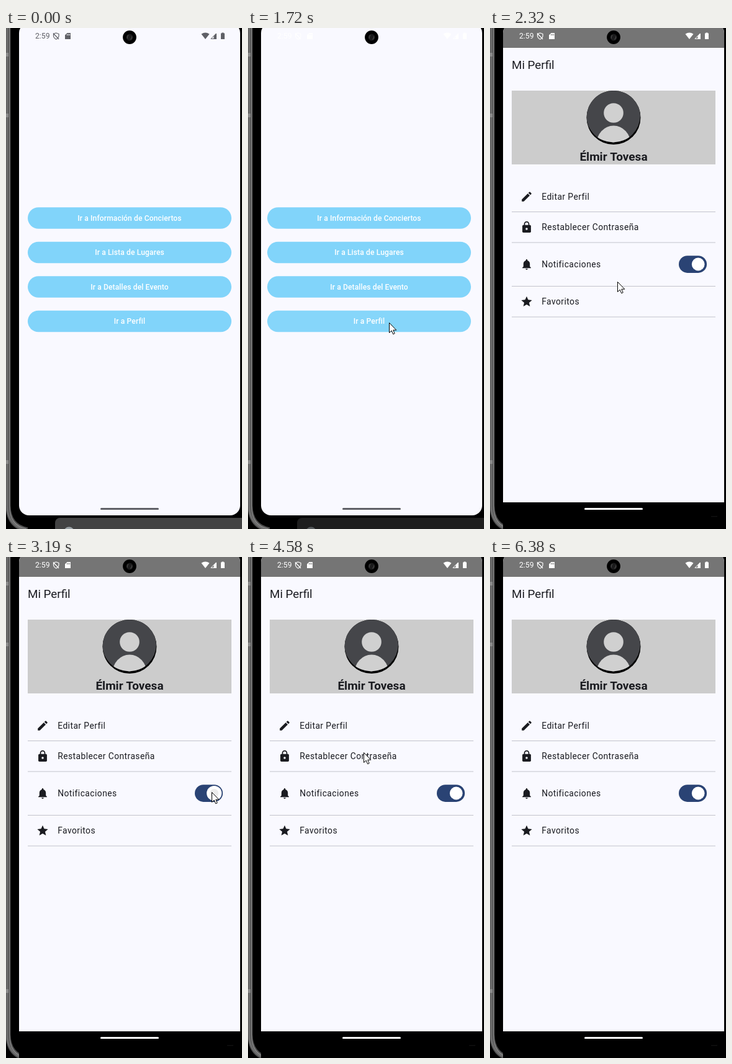
An HTML page with a canvas for the animation above (6980 ms loop, 380 by 808 pixels).

```html
<!DOCTYPE html>
<html lang="es">
<head>
<meta charset="utf-8">
<style>
  html, body { margin: 0; width: 100%; height: 100%; overflow: hidden; background: #000; }
  canvas { display: block; }
</style>
</head>
<body>
<canvas id="stage" width="380" height="808"></canvas>
<script>
const LOOP = 6980, STEP = 66.5;
const FONT = 'Roboto, sans-serif';
const PAPER = '#f9f9ff', INK = '#1a1b20';
const stage = document.getElementById('stage').getContext('2d');
const layer = document.createElement('canvas');
layer.width = 380;
layer.height = 808;
const layerCtx = layer.getContext('2d');
let c = stage;

const smooth = u => u * u * (3 - 2 * u);
const linear = u => u;
const mix = (a, b, u) => a + (b - a) * u;

// Keys are [step, value, ...]; returns the values at a step.
function tween(keys, step, ease = linear) {
  if (step <= keys[0][0]) return keys[0].slice(1);
  for (let i = 1; i < keys.length; i++) {
    const a = keys[i - 1], b = keys[i];
    if (step <= b[0]) {
      const u = ease((step - a[0]) / (b[0] - a[0]));
      return a.slice(1).map((v, j) => mix(v, b[j + 1], u));
    }
  }
  return keys[keys.length - 1].slice(1);
}

function rect(x, y, w, h, color) {
  c.fillStyle = color;
  c.fillRect(x, y, w, h);
}
function round(x, y, w, h, r, color) {
  c.fillStyle = color;
  c.beginPath();
  c.roundRect(x, y, w, h, r);
  c.fill();
}
function disc(x, y, r, color) {
  c.fillStyle = color;
  c.beginPath();
  c.arc(x, y, r, 0, 7);
  c.fill();
}
function text(str, x, y, size, color, { weight = 400, align = 'left', spacing = 0 } = {}) {
  c.font = `${weight} ${size}px ${FONT}`;
  c.textAlign = align;
  c.letterSpacing = spacing + 'px';
  c.fillStyle = color;
  c.fillText(str, x, y);
}
function at(x, y, scale, draw) {
  c.save();
  c.translate(x, y);
  c.scale(scale, scale);
  draw();
  c.restore();
}
function shape(d, color) {
  c.fillStyle = color;
  c.fill(new Path2D(d), 'evenodd');
}
function outline(d, color, width) {
  c.strokeStyle = color;
  c.lineWidth = width;
  c.lineJoin = 'round';
  c.stroke(new Path2D(d));
}

// Icons live in a 24 unit box.
const icons = {
  pencil() {
    shape('M3 17.25V21H6.75L17.8 9.9 14.1 6.2ZM20.7 7Q21.3 6.3 20.7 5.6L18.4 3.3Q17.7 2.7 17 3.3L15.1 5.1 18.9 8.9Z', INK);
  },
  lock() {
    outline('M8 9V6A4 4 0 0 1 16 6V9', INK, 2);
    round(4, 8, 16, 14, 2, INK);
    disc(12, 15, 2, PAPER);
  },
  bell() {
    shape('M10 20H14A2 2 0 0 1 10 20ZM18 16V11C18 8 16.4 5.4 13.5 4.7V4A1.5 1.5 0 0 0 10.5 4V4.7C7.6 5.4 6 8 6 11V16L4 18V19H20V18Z', INK);
  },
  star() {
    c.fillStyle = INK;
    c.beginPath();
    for (let i = 0; i < 10; i++) {
      const r = i % 2 ? 4.8 : 10.5, a = i * Math.PI / 5;
      c.lineTo(12 + r * Math.sin(a), 12.5 - r * Math.cos(a));
    }
    c.fill();
  }
};

function screenClip(bottom) {
  c.beginPath();
  c.roundRect(21, -8, 356, bottom + 8, bottom > 770 ? 16 : [16, 16, 0, 0]);
  c.clip();
}

function statusBar(color) {
  text('2:59', 47, 17, 12.2, color);
  outline('M76.5 9.5L80.5 8 85 9.5V13Q84.5 16.5 80.7 18.2 77 16.5 76.5 13ZM76 8.5L85 18', color, 1.2);
  shape('M98.5 8H104V18H95V11.5ZM98 9.8V12H99V9.8ZM100 9.8V12H101V9.8ZM102 9.8V12H103V9.8Z', color);
  shape('M314.5 9.8Q321 5 327.5 9.8L321 18Z', color);
  outline('M330 17.4L338.4 9V17.4Z', color, 1);
  shape('M334.5 13L339 8.5V18H334.5Z', color);
  shape('M347.5 7.5H350.5V8.5H352V18H346V8.5H347.5Z', color);
}

function phone() {
  rect(0, 0, 380, 808, '#000');
  for (const [x, width, color] of [[3.5, 8, '#4c4c4c'], [2, 3, '#6e6e6e'], [5.5, 1.2, '#8e8e8e']])
    outline(`M${x} -5V770Q${x} ${805 - x / 2} ${38 - x} ${813 - x}`, color, width);
  for (const y of [40, 138, 697]) rect(0, y, 4, 6, '#8a8a8a');
}

function camera() {
  disc(199, 15, 10.9, '#000');
  disc(199, 15, 5.5, '#1b1b1c');
  c.strokeStyle = '#444';
  c.lineWidth = 1.4;
  for (const angle of [2.6, -0.4]) {
    c.beginPath();
    c.arc(199, 15, 3.6, angle, angle + 1.6);
    c.stroke();
  }
}

function toolbar(alpha) {
  if (alpha <= 0) return;
  c.save();
  c.globalAlpha = alpha;
  round(79, 790, 320, 40, 8, '#434343');
  disc(101.5, 813, 8.5, '#9aa2a6');
  c.restore();
}

const labels = ['Ir a Información de Conciertos', 'Ir a Lista de Lugares', 'Ir a Detalles del Evento', 'Ir a Perfil'];

function home(step, dx) {
  c.save();
  screenClip(786);
  rect(21, 0, 356, 786, PAPER);
  statusBar(step < 24 ? '#5f6066' : step < 25 ? '#c4c4c8' : '#fff');
  round(152, 774, 94, 3, 1.5, '#5f6066');
  c.translate(dx, 0);
  labels.forEach((label, i) => {
    const y = 289.2 + i * 55.5;
    round(35, y, 328, 34.6, 17.3, '#81d4fa');
    if (i === 3 && step >= 19) {
      c.save();
      c.clip();
      disc(226, y + 18, (step - 18) * 45, `rgba(255,255,255,${step < 25 ? 0.1 : 0.04})`);
      c.restore();
    }
    text(label, 199, y + 21.6, 12.13, '#fff', { weight: 500, align: 'center', spacing: 0.09 });
  });
  c.restore();
}

function avatar() {
  const x = 199, y = 144.5, r = 43.5;
  disc(x, y, r, '#000');
  c.save();
  c.clip();
  disc(x - 0.5, y - 3.6, r, '#45464a');
  c.clip();
  disc(x, 137, 15.8, '#d0d0d0');
  c.beginPath();
  c.ellipse(x, 187, 27.5, 29.5, 0, 0, 7);
  c.fill();
  c.restore();
}

const rgbMix = (a, b, u) => `rgb(${a.map((v, i) => Math.round(mix(v, b[i], u)))})`;

function toggle(step) {
  const [on] = tween([[48, 1], [50, 0], [53, 0], [55, 1]], step);
  const age = step - (step < 53 ? 47 : 53);
  const press = age < 0 ? 0 : Math.max(0, 1 - Math.abs(age - 1) / 2);
  const x = mix(318, 335.2, on), y = 381;
  round(304, 367.2, 45.1, 27.7, 13.85, rgbMix([117, 119, 128], [42, 67, 116], on));
  if (on < 1) round(305.7, 368.9, 41.7, 24.3, 12.15, rgbMix([226, 226, 233], [42, 67, 116], on));
  disc(x, y, mix(mix(7, 10.4, on), 12.1, press), rgbMix([117, 119, 128], [255, 255, 255], on));
  if (age >= 0 && age < 6)
    disc(x, y, Math.min(17.5, 3 + age * 4), `rgba(26,27,32,${0.1 * (1 - age / 6)})`);
}

const rows = [
  ['pencil', 'Editar Perfil', 272, 296.5],
  ['lock', 'Restablecer Contraseña', 321.3, 346],
  ['bell', 'Notificaciones', 381.3, 416.5],
  ['star', 'Favoritos', 441.3, 466]
];

function profile(step, dx) {
  rect(21, 700, 356, 108, '#000');
  rect(356, 787, 10, 1.5, '#101010');
  round(152, 774, 94, 3, 1.5, `rgba(255,255,255,${tween([[28, 0], [31, 1]], step)[0]})`);
  c.save();
  screenClip(765);
  rect(21, 0, 356, 765, PAPER);
  rect(21, 0, 356, 32, '#757575');
  statusBar('#fff');
  c.translate(dx, 0);
  text('Mi Perfil', 35, 66.3, 18.8, INK);
  rect(35, 101, 328, 119, '#ccc');
  avatar();
  text('Élmir Tovesa', 199, 214, 19.05, INK, { weight: 700, align: 'center' });
  for (const [icon, label, y, line] of rows) {
    at(48.6, y - 10.4, 0.867, icons[icon]);
    text(label, 83.2, y + 4.7, 13.86, INK, { spacing: 0.43 });
    rect(35, line - 0.5, 328, 1, '#c2c3cb');
  }
  toggle(step);
  c.restore();
}

const path = [
  [3, 356, 771], [13, 224, 477], [14, 224, 477], [18, 220, 475], [23, 227, 475], [26, 227, 475],
  [28, 223, 478], [30, 223, 478], [35, 205, 409], [40, 139, 196], [46, 331, 379], [56, 331, 379],
  [61, 212, 265], [63, 194, 280], [69, 186, 315], [73, 167, 361], [74, 167, 361], [77, 185, 376],
  [80, 185, 376], [85, 365, 392], [87, 365, 392], [91, 220, 501], [93, 220, 501], [95, 331, 711]
];

function cursor(step) {
  if (step < 3 || step > 95) return;
  const [x, y] = tween(path, step, smooth);
  at(Math.round(x) + 0.5, Math.round(y) + 0.5, 1, () => {
    const arrow = 'M0 0V16L3.7 12.6 6.2 18.3 8.7 17.2 6.3 11.7H11.3Z';
    shape(arrow, '#fff');
    outline(arrow, '#000', 1);
  });
}

function draw(time) {
  const step = Math.floor((time % LOOP + 15) / STEP);
  phone();
  if (step < 28) home(step, tween([[25, 0], [26, -4], [27, -19]], step)[0]);
  toolbar(tween([[24, 1], [25, 0.85], [26, 0.45], [27, 0.1], [28, 0]], step)[0]);
  if (step >= 27) {
    const dx = tween([[27, 19], [28, 8.5], [29, 4.6], [30, 2.5], [31, 1.2], [33, 0]], step)[0];
    c = layerCtx;
    c.clearRect(0, 0, 380, 808);
    profile(step, dx);
    c = stage;
    c.globalAlpha = step < 28 ? 0.75 : 1;
    c.drawImage(layer, 0, 0);
    c.globalAlpha = 1;
  }
  camera();
  cursor(step);
}

const start = performance.now();
function frame() {
  draw(performance.now() - start);
  requestAnimationFrame(frame);
}
frame();
</script>
</body>
</html>
```
